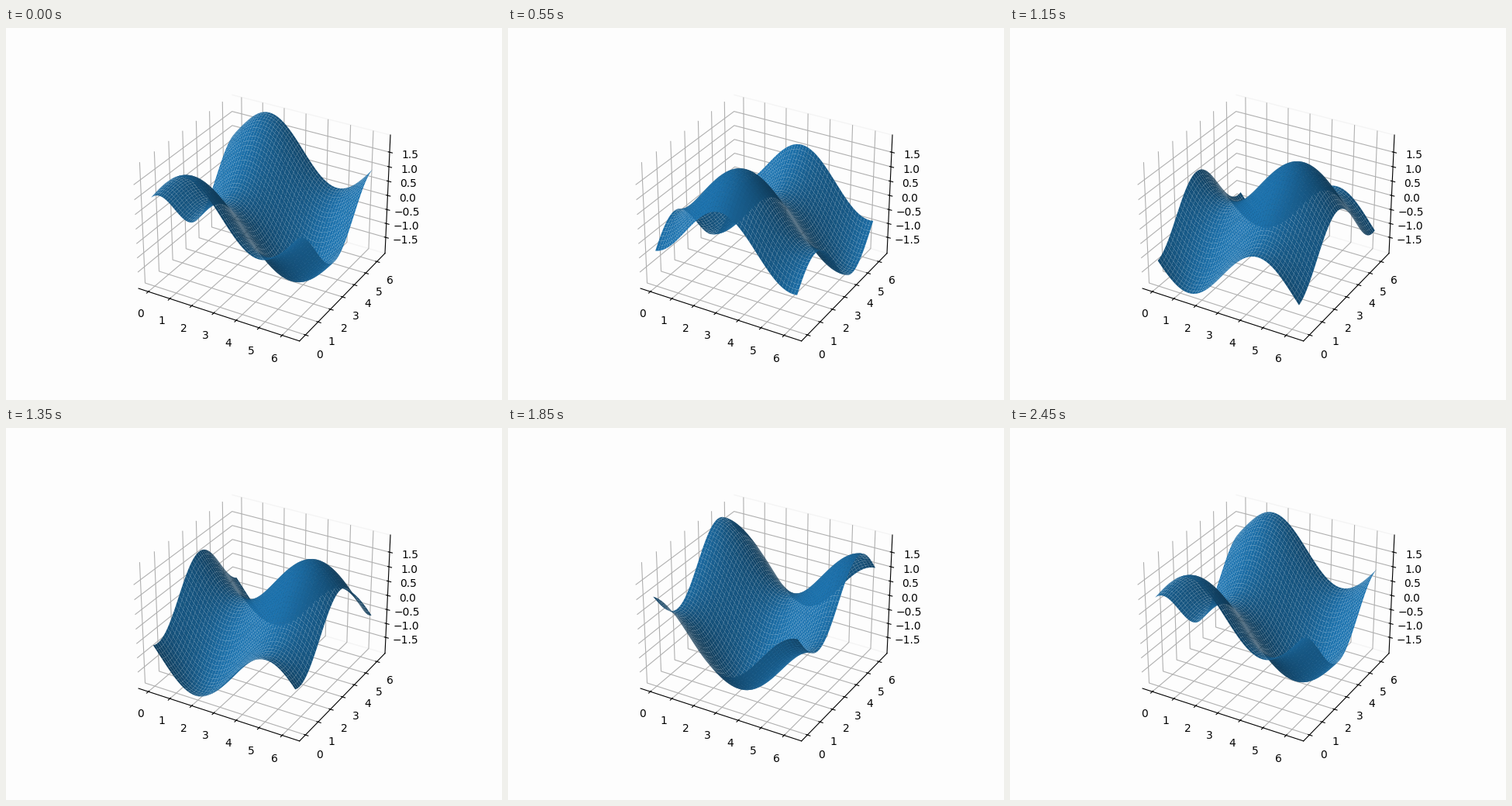
Write a matplotlib script that moves like this. It is 640 px wide and 480 px high and loops after 2.5 s.

```python
import matplotlib.pyplot as plt
import numpy as np
from matplotlib.animation import FuncAnimation

FRAMES = 50
BACKGROUND = "#fdfdfd"

angles = np.linspace(0, 2 * np.pi, 50)
phases = np.linspace(0, 2 * np.pi, FRAMES)
X, Y = np.meshgrid(angles, angles)


def wave(phase):
    return np.sin(X - phase) + np.cos(Y - phase)


def padded(low, high, share=1 / 48):
    margin = (high - low) * share
    return low - margin, high + margin


fig = plt.figure(figsize=(6.4, 4.8), dpi=100, facecolor=BACKGROUND)
ax = fig.add_subplot(projection="3d")
ax.set_facecolor("none")

# Only the back wall shows a faint outline.
for axis, edge in ((ax.xaxis, "none"), (ax.yaxis, "#ececec"), (ax.zaxis, "none")):
    axis.pane.set_facecolor("none")
    axis.pane.set_edgecolor(edge)

start = wave(0)
floor = padded(*padded(0, 2 * np.pi, 0.05))
ax.set_xlim(*floor)
ax.set_ylim(*floor)
ax.set_zlim(*padded(start.min(), start.max()))
ax.set_xticks(range(7))
ax.set_yticks(range(7))
ax.set_zticks(np.arange(-1.5, 1.6, 0.5))


def update(frame):
    for surface in list(ax.collections):
        surface.remove()
    return [ax.plot_surface(X, Y, wave(phases[frame]), color="C0")]


anim = FuncAnimation(fig, update, frames=FRAMES, interval=50,
                     repeat=True, repeat_delay=0, blit=False)
plt.show()
```
